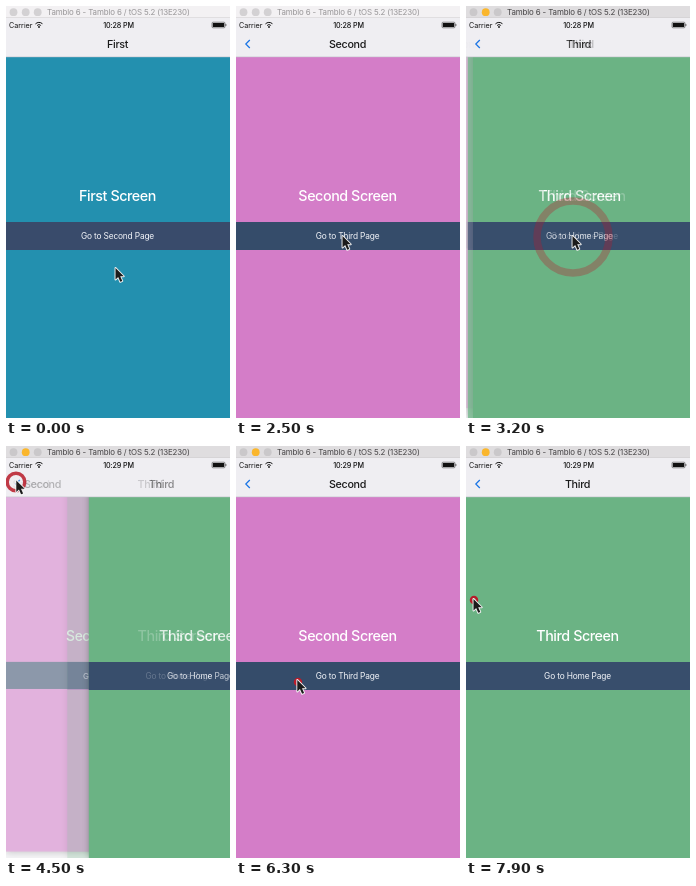
Animation, 224 px wide and 412 px high, one loop 8000 ms. Source, as an HTML page with a canvas:

```html
<!DOCTYPE html>
<html lang="en">
<head>
<meta charset="utf-8">
<title>Card stack navigation</title>
<style>
html, body { margin: 0; width: 100%; height: 100%; overflow: hidden; background: #eee; }
canvas { display: block; width: 224px; height: 412px; }
</style>
</head>
<body>
<canvas id="stage" width="224" height="412"></canvas>
<script>
const W = 224, H = 412, LOOP = 8000, STEP = 100, SLIDE = 400, TRACE = 24;
const FONT = 'Inter, Roboto, sans-serif';
const view = document.getElementById('stage').getContext('2d');
const buffer = document.createElement('canvas');
buffer.width = W;
buffer.height = H;
const echo = buffer.getContext('2d');

const cards = [
  { name: 'First', link: 'Go to Second Page', color: '#2390af', button: '#394b6b' },
  { name: 'Second', link: 'Go to Third Page', color: '#d47dc8', button: '#354c6a' },
  { name: 'Third', link: 'Go to Home Page', color: '#6bb384', button: '#384e6c' }
];
// start time, change of stack depth
const slides = [[1290, 1], [2826, 1], [4328, -1], [6320, 1]];
// press time, centre of the ring
const presses = [[1290, 107, 231], [2820, 107, 231], [4328, 10, 36], [6300, 62, 236], [7900, 8, 154]];
// start time, end time, tip of the pointer
const trips = [[500, 1250, 106.5, 230], [3500, 4250, 10.3, 34.5], [5200, 6050, 61.3, 234], [7200, 7850, 7.5, 153]];

const clamp = x => Math.min(1, Math.max(0, x));
const smooth = x => x * x * (3 - 2 * x);
const easeInOut = x => x < .5 ? 2 * x * x : 1 - 2 * (1 - x) ** 2;

const depth = t => slides.reduce((sum, [at, dir]) => sum + dir * easeInOut(clamp((t - at) / SLIDE)), 0);
const pushing = t => slides.some(([at, dir]) => dir > 0 && t >= at && t < at + SLIDE);

function text(c, str, x, y, size, color, weight = 400, align = 'center', spacing = -.02) {
  c.font = `${weight} ${size}px ${FONT}`;
  c.letterSpacing = spacing * size + 'px';
  c.textAlign = align;
  c.textBaseline = 'alphabetic';
  c.fillStyle = color;
  c.fillText(str, x, y);
}

function box(c, x, y, w, h, color) {
  c.fillStyle = color;
  c.fillRect(x, y, w, h);
}

function disc(c, x, y, r, color) {
  c.fillStyle = color;
  c.beginPath();
  c.arc(x, y, r, 0, 7);
  c.fill();
}

function drawCard(c, card, d, pressed) {
  c.save();
  if (d > 0) {
    c.translate(W * d, 0);
  } else {
    const k = 1 + .05 * d;
    c.translate(112 + 6 * d, 212);
    c.scale(k, k);
    c.translate(-112, -212);
  }
  c.shadowColor = 'rgba(0,0,0,.4)';
  c.shadowBlur = 7;
  box(c, 0, 12, W, 400, card.color);
  c.shadowColor = 'transparent';
  text(c, card.name + ' Screen', 111.5, 194.5, 14.3, '#fff', 500, 'center', -.03);
  c.globalAlpha = pressed ? .3 : 1;
  box(c, 0, 216, W, 28, card.button);
  text(c, card.link, 111.5, 233.3, 8.36, '#f4f6fa');
  c.restore();
  if (d < 0) {
    c.globalAlpha = -.7 * d;
    box(c, 0, 12, W, 400, '#f4f4f6');
    c.globalAlpha = 1;
  }
}

function drawHeader(c, pos, low, high) {
  box(c, 0, 12, W, 39, '#efeef2');
  box(c, 0, 50.6, W, .6, '#c4c4ca');
  for (let i = low; i <= high; i++) {
    c.globalAlpha = 1 - Math.abs(i - pos);
    text(c, cards[i].name, 111.5 + 119 * (i - pos), 42, 10.75, '#1a1a1a', 500, 'center', -.03);
    if (i > 0) {
      c.strokeStyle = '#1673e6';
      c.lineWidth = 1.2;
      c.beginPath();
      c.moveTo(13.8, 34);
      c.lineTo(9.8, 38);
      c.lineTo(13.8, 42);
      c.stroke();
    }
  }
  c.globalAlpha = 1;
}

function drawStatus(c, t) {
  text(c, 'Carrier', 3, 21.7, 7.2, '#111', 400, 'left', 0);
  text(c, t < 4000 ? '10:28 PM' : '10:29 PM', 112.5, 21.7, 7.2, '#111', 500);
  c.strokeStyle = '#111';
  c.lineWidth = 1;
  for (const r of [2.6, 4.9]) {
    c.beginPath();
    c.arc(33, 21.3, r, -Math.PI * .76, -Math.PI * .24);
    c.stroke();
  }
  disc(c, 33, 21, .9, '#111');
  c.lineWidth = .6;
  c.strokeStyle = '#444';
  c.beginPath();
  c.roundRect(206, 16.2, 13, 5.6, 1);
  c.stroke();
  box(c, 206.8, 17, 11.4, 4, '#111');
  box(c, 219.5, 18, .8, 2, '#444');
}

function drawWindowBar(c, t) {
  const active = t >= 2850;
  const light = active ? '#cac8ca' : '#d3d1d3';
  box(c, 0, 0, W, 12, active ? '#dfdddf' : '#f3f1f3');
  box(c, 0, 11.5, W, .5, '#cdcbcd');
  disc(c, 7.5, 6.2, 3.9, light);
  disc(c, 19.7, 6.2, 3.9, active ? '#fab62c' : light);
  disc(c, 31.7, 6.2, 3.9, light);
  text(c, 'Tamblo 6 - Tamblo 6 / tOS 5.2 (13E230)', 41, 9.2, 7.9, active ? '#444244' : '#979597', 400, 'left', -.015);
}

function drawScene(c, t) {
  const pos = depth(t), low = Math.floor(pos), high = Math.ceil(pos);
  box(c, 0, 0, W, H, '#f4f4f6');
  for (let i = low; i <= high; i++) drawCard(c, cards[i], i - pos, i < pos && pushing(t));
  drawHeader(c, pos, low, high);
  drawStatus(c, t);
  drawWindowBar(c, t);
}

function drawRing(c, t) {
  for (const [at, x, y] of presses) {
    const age = t - at;
    if (age < 0 || age > 460) continue;
    const k = (age / 380) ** 2.2;
    c.globalAlpha = 1 - (age / 460) ** 2;
    c.strokeStyle = '#b81c2a';
    c.lineWidth = 2.5 + 5 * k;
    c.beginPath();
    c.arc(x, y, 3 + 33 * k, 0, 7);
    c.stroke();
  }
  c.globalAlpha = 1;
}

function drawPointer(c, t) {
  let x = 109.5, y = 262;
  for (const [from, to, tx, ty] of trips) {
    const k = smooth(clamp((t - from) / (to - from)));
    x += (tx - x) * k;
    y += (ty - y) * k;
  }
  c.save();
  c.translate(x, y);
  c.scale(.92, .92);
  c.beginPath();
  [[0, 0], [0, 12.5], [2.9, 9.8], [5.2, 15], [7.4, 14], [5.1, 9], [9, 9]].forEach(p => c.lineTo(...p));
  c.closePath();
  c.lineJoin = 'round';
  c.lineWidth = 2;
  c.strokeStyle = '#f4f4f4';
  c.stroke();
  c.fillStyle = '#1c1c1c';
  c.fill();
  c.restore();
}

function frame(now) {
  const t = Math.floor(now % LOOP / STEP) * STEP;
  drawScene(view, t);
  // a faint trace of the moment before, as in a blended recording
  if (depth(t) !== depth(t - TRACE)) {
    drawScene(echo, t - TRACE);
    view.globalAlpha = .24;
    view.drawImage(buffer, 0, 0);
    view.globalAlpha = 1;
  }
  drawRing(view, t);
  drawPointer(view, t);
  requestAnimationFrame(frame);
}
requestAnimationFrame(frame);
</script>
</body>
</html>
```
